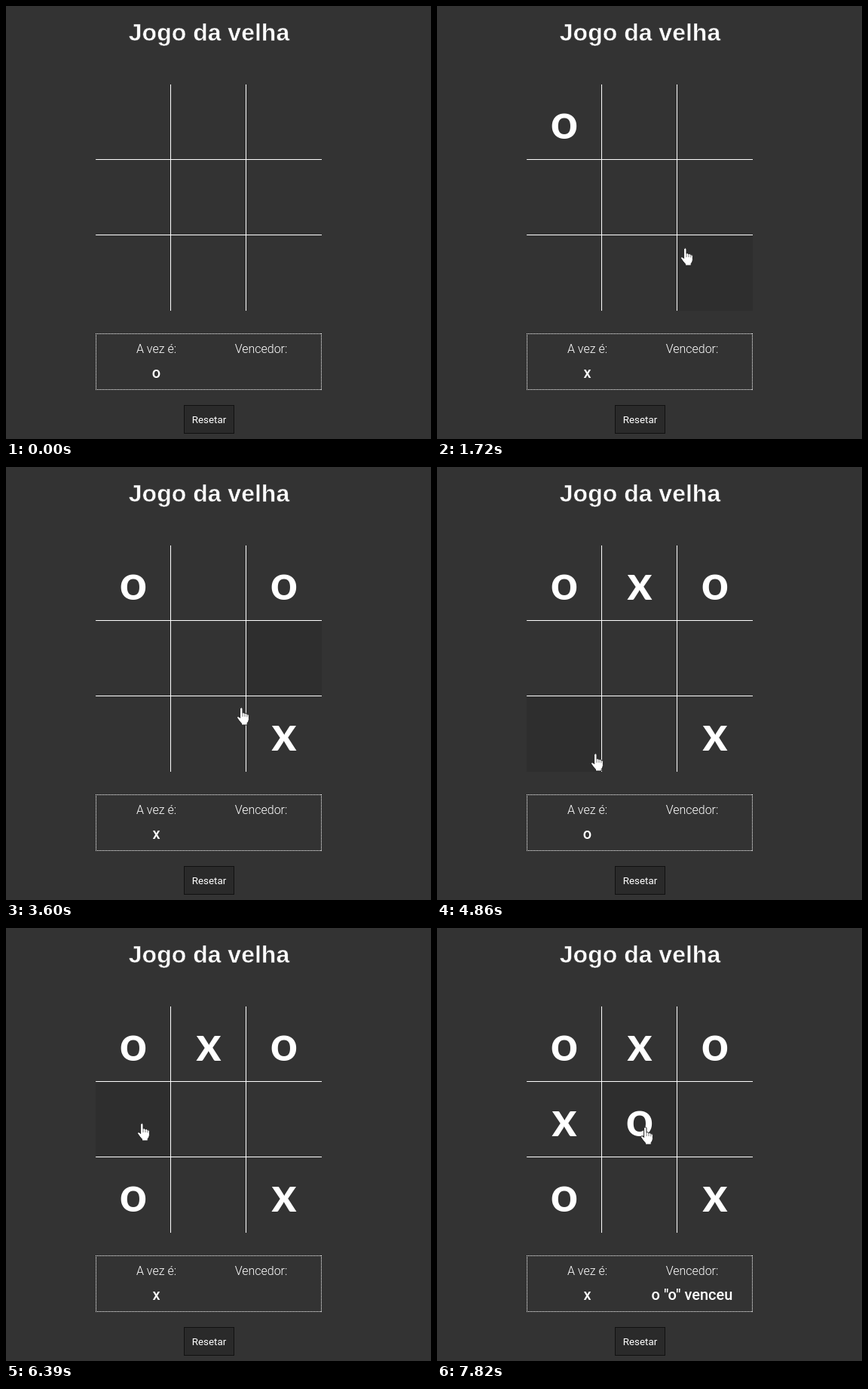
An HTML page for the animation above (8 s loop, 564 by 574 pixels).

```html
<!DOCTYPE html>
<html lang="pt-BR">
<head>
<meta charset="utf-8">
<title>Jogo da velha</title>
<style>
  html, body { margin: 0; width: 100%; height: 100%; overflow: hidden; background: #333; }
  svg { display: block; }
  text { fill: #fff; text-anchor: middle; font-family: Roboto, sans-serif; }
  .title { font: bold 32px "Liberation Sans", Arial, sans-serif; stroke: #333; stroke-width: .5; }
  .mark { font: bold 64px Lato, sans-serif; }
  .label { font-size: 16px; font-weight: 300; }
  .value { font-size: 20px; font-weight: 500; }
  .button { font-size: 13.33px; }
  .grid, .info { stroke: #fff; fill: none; }
  .info { stroke-dasharray: 1 1; }
</style>
</head>
<body>
<svg width="564" height="574" viewBox="0 0 564 574">
  <text class="title" x="269.5" y="46">Jogo da velha</text>

  <rect id="hover" width="100" height="100" fill="#2e2e2e"/>
  <path class="grid" d="M218.5 104V404M318.5 104V404M119 203.5H419M119 303.5H419"/>
  <g id="marks"></g>

  <path class="info" d="M119 434.5H419M119 508.5H419M119.5 434V509M418.5 434V509"/>
  <text class="label" x="199.5" y="460">A vez é:</text>
  <text class="label" x="338.5" y="460">Vencedor:</text>
  <text class="value" id="turn" x="199.5" y="493"></text>
  <text class="value" id="winner" x="338.5" y="493"></text>

  <rect x="236.5" y="529.5" width="66" height="37" fill="#2a2a2a" stroke="#111"/>
  <text class="button" x="269.5" y="553">Resetar</text>

  <g id="hand">
    <path fill="#fff" stroke="#222" d="M4.6 2Q6.3 -.3 8 2V8Q9.7 7 11 8.8Q12.8 7.8 13.9 9.8Q16 9 16.4 11.6V16.5Q16.2 19.5 14.2 21.5V24H6.5V22Q4 19.5 .7 14.6Q.7 11.8 3.2 13.2L4.6 14.6Z"/>
    <path fill="none" stroke="#444" stroke-width=".7" d="M8 8V13M11 9V13M13.9 10V13.4"/>
  </g>
</svg>
<script>
const LOOP = 8000, STEP = 30, LEFT = 119, TOP = 104, CELL = 100;

// Each turn: the pointer travels along its stops, evenly timed, and clicks a cell
const turns = [
  { cell: 0, from: 520, to: 1030, click: 1080, stops: [[163, 166]] },
  { cell: 8, from: 1300, to: 2020, click: 2230, stops: [[446, 447], [291, 287], [347, 360]] },
  { cell: 2, from: 2480, to: 3280, click: 3410, stops: [[113, 290], [235, 283], [361, 155]] },
  { cell: 1, from: 3460, to: 4240, click: 4240, stops: [[262, 448], [255, 128], [262, 141]] },
  { cell: 6, from: 4470, to: 5420, click: 5560, stops: [[199, 401], [172, 360]] },
  { cell: 3, from: 5910, to: 6443, click: 6890, stops: [[242, 392], [166, 243]] },
  { cell: 4, from: 7150, to: 7600, click: 7700, stops: [[270, 263]] }
];
const entry = [437, 64];

const $ = id => document.getElementById(id);
const cellX = i => LEFT + i % 3 * CELL;
const cellY = i => TOP + Math.floor(i / 3) * CELL;
const player = k => "ox"[k % 2];
const ease = s => s * s * (3 - 2 * s);
const show = (el, on) => el.style.visibility = on ? "visible" : "hidden";

const marks = turns.map(({ cell }, k) => {
  const mark = document.createElementNS("http://www.w3.org/2000/svg", "text");
  mark.setAttribute("class", "mark");
  mark.setAttribute("x", cellX(cell) + 50);
  mark.setAttribute("y", cellY(cell) + 72);
  mark.textContent = player(k);
  return $("marks").appendChild(mark);
});

function pointerAt(t) {
  const k = Math.max(0, turns.filter(turn => turn.from <= t).length - 1);
  const { from, to, stops } = turns[k];
  const points = [k ? turns[k - 1].stops.at(-1) : entry, ...stops];
  const s = Math.min(1, Math.max(0, (t - from) / (to - from))) * stops.length;
  const i = Math.min(stops.length - 1, Math.floor(s));
  return points[i].map((a, axis) => Math.round(a + (points[i + 1][axis] - a) * ease(s - i)));
}

function cellUnder([x, y]) {
  const col = Math.floor((x + 6 - LEFT) / CELL), row = Math.floor((y + 1 - TOP) / CELL);
  return Math.min(col, row) >= 0 && Math.max(col, row) < 3 ? row * 3 + col : -1;
}

function draw(time) {
  const t = Math.floor(time / STEP) * STEP;
  const active = time >= turns[0].from;
  show($("hand"), active);
  $("hand").setAttribute("transform", `translate(${pointerAt(t)})`);

  // The hover shade trails the pointer by one step
  const cell = active ? cellUnder(pointerAt(t - STEP)) : -1;
  show($("hover"), cell >= 0);
  $("hover").setAttribute("x", cellX(cell));
  $("hover").setAttribute("y", cellY(cell));

  const played = turns.filter(turn => turn.click <= time).length;
  marks.forEach((mark, k) => show(mark, k < played));
  $("turn").textContent = player(played);
  $("winner").textContent = played === turns.length ? 'o "o" venceu' : "";
}

const start = performance.now();
function frame() {
  draw((performance.now() - start) % LOOP);
  requestAnimationFrame(frame);
}
frame();
</script>
</body>
</html>
```
